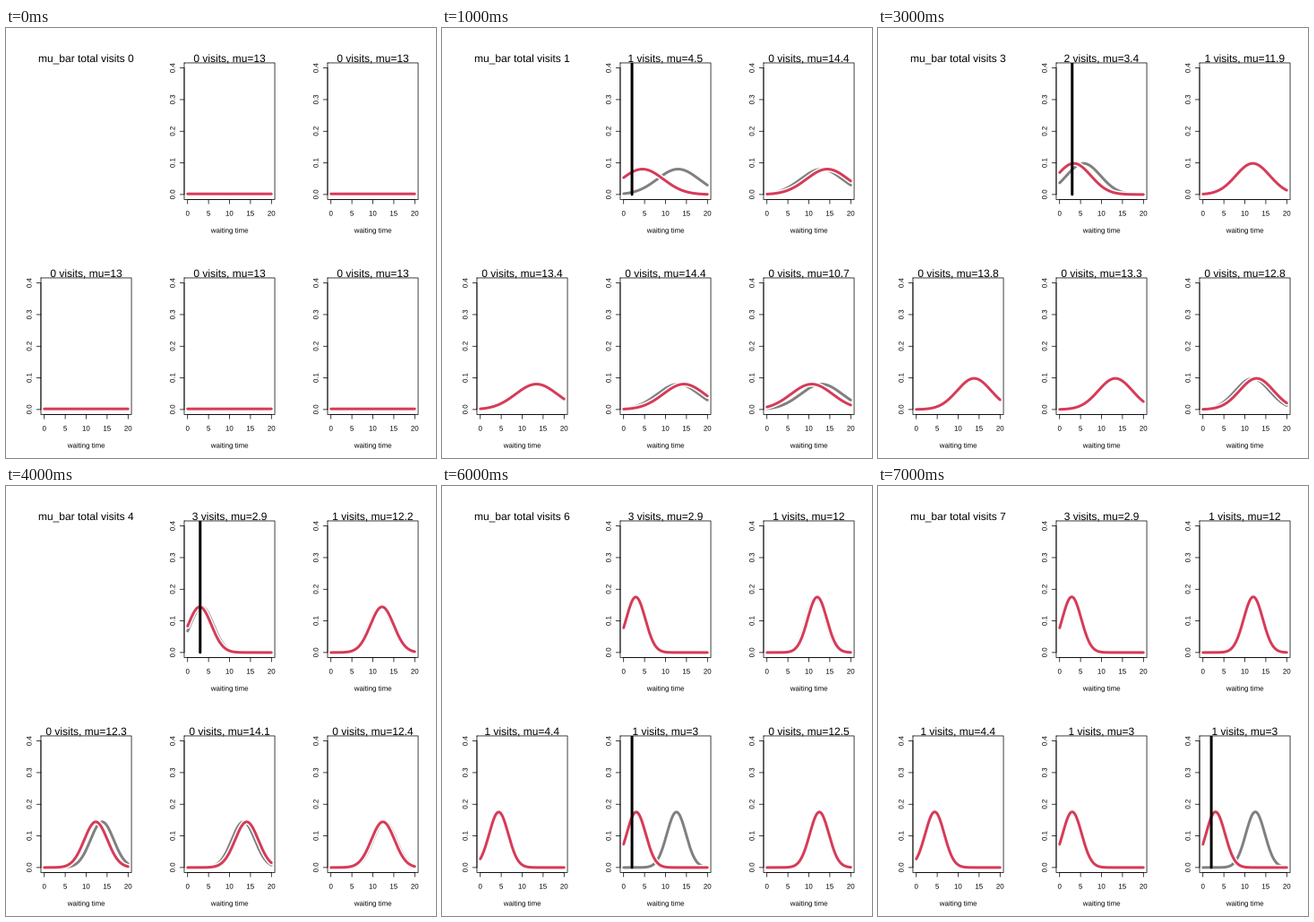
A matplotlib script for the animation above (8000 ms loop, 480 by 480 pixels).

```python
import numpy as np
import matplotlib.pyplot as plt
from matplotlib.animation import FuncAnimation
from matplotlib.patches import PathPatch, Rectangle
from matplotlib.textpath import TextPath
from matplotlib.transforms import Affine2D

plt.rcParams["font.family"] = "Liberation Sans"

SIZE = 480
STEPS = 8
LINE = 9.504                      # one margin line in pixels
LEFT, RIGHT = 4.1 * LINE, 160 - 2.1 * LINE
TOP, BOTTOM = 4.1 * LINE, 240 - 5.1 * LINE
RED, GREY = "#d63b58", "#808080"
PRIOR = 13

# Visits in order: (panel, waiting time)
VISITS = [(0, 2), (1, 12), (0, 3), (0, 3), (2, 4), (3, 2), (4, 2)]
# Estimates of each panel after the prior; the last one holds
TRACKS = [
    (4.5, 5.7, 3.4, 2.9),
    (14.4, 11.9, 11.9, 12.2, 11.7, 12),
    (13.4, 13.8, 13.8, 12.3, 4.4),
    (14.4, 13.3, 13.3, 14.1, 12.6, 3),
    (10.7, 11.8, 12.8, 12.4, 12.7, 12.5, 3),
]

X = np.linspace(0, 20, 201)

fig = plt.figure(figsize=(SIZE / 72, SIZE / 72), dpi=72, facecolor="white")
ax = fig.add_axes([0, 0, 1, 1])
ax.set(xlim=(0, SIZE), ylim=(SIZE, 0))
ax.axis("off")


def estimate(panel, step):
    if step <= 0:
        return PRIOR
    track = TRACKS[panel]
    return track[min(step, len(track)) - 1]


def density(mu, step):
    """Normal curve whose peak rises in an S-shape; flat before any visit."""
    if step == 0:
        return np.full_like(X, 0.002)
    peak = 0.08 + 0.096 / (1 + np.exp(-2.15 * (step - 3.67)))
    return peak * np.exp(-np.pi * (peak * (X - mu)) ** 2)


def stroke(xs, ys, color="black", width=0.75, z=6):
    line, = ax.plot(xs, ys, color=color, lw=width, zorder=z,
                    solid_capstyle="round", solid_joinstyle="round")
    line.set_snap(False)
    return line


class Label:
    """Text as outlines, centred on x with its baseline on y."""

    def __init__(self, x, y, text="", size=7.92, angle=0):
        self.x, self.y, self.size, self.angle = x, y, size, angle
        self.patch = None
        if text:
            self.set(text)

    def set(self, text):
        if self.patch:
            self.patch.remove()
        path = TextPath((0, 0), text, size=self.size)
        box = path.get_extents()
        place = (Affine2D().translate(-(box.x0 + box.x1) / 2, 0)
                 .rotate_deg(self.angle).scale(1, -1)
                 .translate(self.x, self.y))
        self.patch = PathPatch(place.transform_path(path), fc="black", lw=0,
                               zorder=7, snap=False)
        ax.add_patch(self.patch)


class Panel:
    def __init__(self, index):
        row, col = divmod(index + 1, 3)
        self.index = index
        self.ox, self.oy = 160 * col, 240 * row
        x0, x1 = self.ox + LEFT, self.ox + RIGHT
        y0, y1 = self.oy + TOP, self.oy + BOTTOM
        mid = (x0 + x1) / 2

        self.old = stroke([], [], GREY, 3, z=2)
        self.halo = stroke([], [], "white", 6, z=3)
        self.new = stroke([], [], RED, 3, z=4)
        self.bar = stroke([], [], "black", 3, z=5)
        area = Rectangle((x0, y0), x1 - x0, y1 - y0, transform=ax.transData)
        for line in (self.old, self.halo, self.new, self.bar):
            line.set_clip_path(area)

        stroke([x0, x1, x1, x0, x0], [y0, y0, y1, y1, y0])
        stroke([self.px(0), self.px(20)], [y1, y1])
        stroke([x0, x0], [self.py(0), self.py(0.4)])
        for i in range(5):
            x, y = self.px(5 * i), self.py(0.1 * i)
            stroke([x, x], [y1, y1 + LINE / 2])
            stroke([x0 - LINE / 2, x0], [y, y])
            Label(x, y1 + 1.9 * LINE, str(5 * i))
            Label(x0 - 1.1 * LINE, y, f"{0.1 * i:.1f}", angle=90)
        Label(mid, y1 + 3.9 * LINE, "waiting time")
        self.title = Label(mid, y0 - 0.1 * LINE, size=12)

    def px(self, x):
        return self.ox + LEFT + (x + 0.8) / 21.6 * (RIGHT - LEFT)

    def py(self, y):
        return self.oy + BOTTOM - (y + 0.016) / 0.432 * (BOTTOM - TOP)

    def show(self, step):
        mu = estimate(self.index, step)
        before = density(estimate(self.index, step - 1), step)
        after = density(mu, step)
        for line, ys in ((self.old, before), (self.halo, after), (self.new, after)):
            line.set_data(self.px(X), self.py(ys))

        done = VISITS[:step]
        if done and done[-1][0] == self.index:
            x = self.px(done[-1][1])
            self.bar.set_data([x, x], [self.oy, self.py(0)])
        else:
            self.bar.set_data([], [])
        count = sum(panel == self.index for panel, _ in done)
        self.title.set(f"{count} visits, mu={mu:g}")


panels = [Panel(i) for i in range(5)]
total = Label((LEFT + RIGHT) / 2, TOP - 0.1 * LINE, size=12)


def update(step):
    total.set(f"mu_bar total visits {step}")
    for panel in panels:
        panel.show(step)
    return []


anim = FuncAnimation(fig, update, frames=STEPS, interval=1000,
                     repeat=True, repeat_delay=0, blit=False)
plt.show()
```
